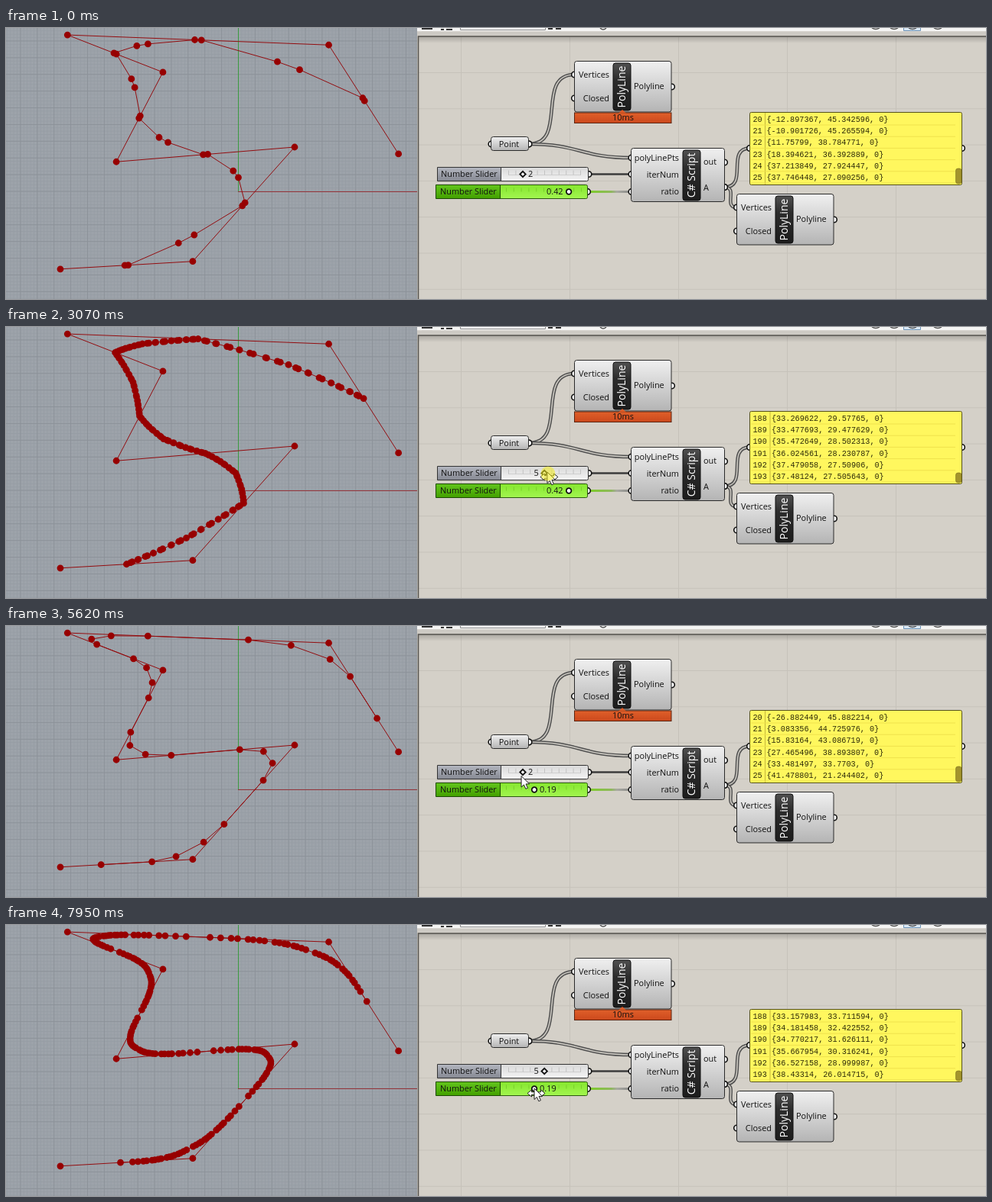
An HTML page that plays this animation: 1280 by 355 pixels, repeating every 8000 ms.

```html
<!DOCTYPE html>
<html lang="en">
<head>
<meta charset="utf-8">
<title>Corner cutting</title>
<style>
  html, body { margin: 0; width: 100%; height: 100%; overflow: hidden; background: #d4d0c8; }
  svg { display: block; width: 1280px; height: 355px; }
  text { font: 10.9px "Open Sans", "Noto Sans", sans-serif; fill: #111; white-space: pre; }
  .end { text-anchor: end; }
  .mid { text-anchor: middle; }
  .icon { font-size: 14px; fill: #fff; text-anchor: middle; }
  .mono text { font: 10.2px "Liberation Mono", "DejaVu Sans Mono", monospace; fill: #2c2a08; }
  .body { fill: url(#steel); stroke: #2a2a2a; }
  .plate { fill: url(#coal); stroke: #111; }
  .wire { fill: none; stroke: #505050; stroke-width: 4.6; }
  .core { fill: none; stroke: #c9c6bf; stroke-width: 1.7; }
  .core, .plug { marker-start: url(#plug); marker-end: url(#plug); }
  .line { fill: none; stroke: #930c0f; stroke-width: 1; }
  .dots { fill: none; stroke: #970000; stroke-width: 8.8; stroke-linecap: round; }
  .knob { fill: #fff; stroke: #111; stroke-width: 1.8; }
  .hand { fill: #fff; stroke: #222; stroke-width: 1; stroke-linejoin: round; }
</style>
</head>
<body>
<svg viewBox="0 0 1280 355">
  <defs>
    <linearGradient id="steel" x2="0" y2="1"><stop stop-color="#f0f0f0"/><stop offset="1" stop-color="#b4b4b4"/></linearGradient>
    <linearGradient id="coal" x2="0" y2="1"><stop stop-color="#505050"/><stop offset=".35" stop-color="#2c2c2c"/><stop offset="1" stop-color="#1c1c1c"/></linearGradient>
    <linearGradient id="rust" x2="0" y2="1"><stop stop-color="#e0602a"/><stop offset="1" stop-color="#cb481c"/></linearGradient>
    <linearGradient id="slate" x2="0" y2="1"><stop stop-color="#b4b7c0"/><stop offset="1" stop-color="#858892"/></linearGradient>
    <linearGradient id="chalk" x2="0" y2="1"><stop stop-color="#d9d9d9"/><stop offset="1" stop-color="#f4f4f4"/></linearGradient>
    <linearGradient id="leaf" x2="0" y2="1"><stop stop-color="#62c41c"/><stop offset="1" stop-color="#43a000"/></linearGradient>
    <linearGradient id="lime" x2="0" y2="1"><stop stop-color="#86e62e"/><stop offset="1" stop-color="#a2f650"/></linearGradient>
    <linearGradient id="fade" gradientUnits="userSpaceOnUse" x1="763" x2="813"><stop stop-color="#7ecb2c"/><stop offset=".55" stop-color="#8fb85c"/><stop offset=".7" stop-color="#a9a9a3"/><stop offset="1" stop-color="#8f8f8b"/></linearGradient>
    <linearGradient id="shade" x2="0" y2="1"><stop stop-color="#000" stop-opacity=".2"/><stop offset="1" stop-color="#000" stop-opacity="0"/></linearGradient>
    <pattern id="fine" width="4.378" height="4.378" patternUnits="userSpaceOnUse" x="303" y="213.5"><path d="M.5 0V5M0 .5H5" stroke="#969ca3" stroke-width=".8"/></pattern>
    <pattern id="bold" width="21.89" height="21.89" patternUnits="userSpaceOnUse" x="303" y="213.5"><path d="M.5 0V22M0 .5H22" stroke="#8c9299"/></pattern>
    <pattern id="sheet" width="142" height="47.3" patternUnits="userSpaceOnUse" x="594" y="58"><path d="M.5 0V48M0 .5H142" stroke="#c6c2ba"/></pattern>
    <circle id="grip" r="3.8" fill="#fff" stroke="#111" stroke-width="1.6"/>
    <marker id="plug" markerUnits="userSpaceOnUse" markerWidth="10" markerHeight="10" refX="5" refY="5"><use href="#grip" x="5" y="5"/></marker>
    <g id="poly">
      <use href="#grip" x="742.5" y="92"/><use href="#grip" x="869.5" y="77"/>
      <rect class="body" x="742.5" y="43.5" width="126.5" height="66.5" rx="3"/>
      <rect class="plate" x="793" y="46" width="23" height="62" rx="3"/>
      <text class="icon" transform="translate(809 77) rotate(-90)">PolyLine</text>
      <text class="end" x="788" y="65">Vertices</text>
      <text class="end" x="788" y="96">Closed</text>
      <text x="820" y="80">Polyline</text>
    </g>
  </defs>

  <!-- viewport -->
  <rect width="537" height="355" fill="#9da3aa"/>
  <rect width="537" height="355" fill="url(#fine)"/>
  <rect width="537" height="355" fill="url(#bold)"/>
  <path d="M303.5 0V214" stroke="#3a9a3f"/>
  <path d="M303 214.5H537" stroke="#96343a"/>
  <path id="frame" class="line"/>
  <path id="curve" class="line"/>
  <path id="dots" class="dots"/>

  <!-- canvas -->
  <rect x="537" width="743" height="355" fill="#d4d0c8"/>
  <rect x="539" y="11" width="741" height="344" fill="url(#sheet)"/>
  <rect x="539" y="11" width="741" height="9" fill="url(#shade)"/>
  <rect x="537" width="743" height="4.5" fill="#f5f5f4"/>
  <rect x="537" y="4.5" width="743" height="6" fill="#cdcac4"/>
  <path d="M538.5 355V11H1280" fill="none" stroke="#55534f" stroke-width="1.6"/>
  <path d="M593.5 0V2.5H704.5V0" fill="#fff" stroke="#888"/>
  <path d="M543 1H557M568 2H572M575 2H583M708 1H714M718 1H725" stroke="#333" stroke-width="2"/>
  <path d="M1172.5 0V3.5H1194.5V0" fill="#d9e8f6" stroke="#6d94b8"/>
  <path d="M1131 0q5 3 10 0m14 0q5 3 10 0m14 0q5 3 10 0m23 0q5 3 10 0M776 0q4 4 8 0" fill="none" stroke="#555" stroke-width="1.4"/>

  <g id="wires"></g>
  <path class="plug" d="M761 191.5H817" stroke="#3c3c3c" stroke-width="2.6"/>
  <path class="plug" d="M759.5 214.4L817 214.5" stroke="url(#fade)" stroke-width="3"/>
  <use href="#grip" x="634" y="152"/>
  <use href="#grip" x="938.5" y="176"/>
  <use href="#grip" x="1248.5" y="157.5"/>

  <use href="#poly"/>
  <rect x="742.5" y="111" width="126.5" height="13.5" fill="url(#rust)" stroke="#5c2410"/>
  <path d="M800 111.5L805 107L810 111.5Z" fill="#dc5a26"/>
  <text class="mid" x="806" y="121">10ms</text>
  <use href="#poly" x="212" y="174"/>

  <rect class="body" x="633.5" y="142.5" width="49" height="18" rx="3"/>
  <text class="mid" x="657" y="155.5">Point</text>

  <rect class="body" x="816.5" y="157.5" width="122" height="70" rx="3"/>
  <rect class="plate" x="884" y="160" width="23" height="66" rx="3"/>
  <text class="icon" transform="translate(900 193) rotate(-90)">C# Script</text>
  <text class="end" x="879" y="174">polyLinePts</text>
  <text class="end" x="879" y="195.5">iterNum</text>
  <text class="end" x="879" y="218">ratio</text>
  <text x="911" y="179">out</text>
  <text x="911" y="212.5">A</text>

  <!-- sliders -->
  <rect x="563.5" y="182.5" width="197" height="18" rx="2" fill="url(#chalk)" stroke="#333"/>
  <path d="M563.5 182.5H646.5V200.5H563.5Z" fill="url(#slate)" stroke="#333"/>
  <text x="568" y="195">Number Slider</text>
  <path d="M656 192.5H751" stroke="#cfcfcf"/>
  <path d="M656 189.5H751.5" stroke="#c2c2c2" stroke-width="6" stroke-dasharray="1 8.4"/>
  <rect x="561.5" y="205.5" width="198" height="18" rx="2" fill="url(#lime)" stroke="#2c5a10"/>
  <path d="M561.5 205.5H645.5V223.5H561.5Z" fill="url(#leaf)" stroke="#1d4a05"/>
  <text x="567" y="218">Number Slider</text>
  <path d="M653 212H752" stroke="#79cf2c" stroke-width="5" stroke-dasharray="1 8.8"/>
  <path id="iterKnob" class="knob" d="M-3.7 0L0-3.7L3.7 0L0 3.7Z"/>
  <text id="iterText" y="195"></text>
  <circle id="ratioKnob" class="knob" r="3.3"/>
  <text id="ratioText" y="218"></text>

  <!-- panel -->
  <rect x="971.5" y="110.5" width="277" height="95" rx="2" fill="#fff75e" stroke="#55511c"/>
  <path id="column" stroke="#c4b83a"/>
  <rect id="thumb" x="1240.5" width="7.5" rx="3" fill="#a3942c" stroke="#7a6e1c" stroke-width=".6"/>
  <g id="rows" class="mono"></g>

  <g id="cursor">
    <path id="arrows" class="hand" d="M-9 6.5L-3.5 2V4.8H8.5V2L14 6.5L8.5 11V8.2H-3.5V11Z"/>
    <path class="hand" d="M0 0V14.5L3.4 11.4L5.8 16.8L8.4 15.7L6 10.4H10.6Z"/>
    <circle id="press" cx="1" cy="2" r="9.5" fill="#f4ec1c" opacity=".55"/>
  </g>
</svg>
<script>
const LOOP = 8000, SCALE = 4.378, OX = 303, OY = 214;
const CORNERS = [[-53, -23.25], [-13.5, -20.95], [16.9, 13.25], [-36.3, 8.85], [-22.4, 35.65],
  [-50.876921, 46.808047], [27.077828, 43.8001425], [47.8824695, 11.21456]];

// Pointer stops: time, x, y
const STOPS = [[70, 1048, 305], [480, 572, 182], [850, 675, 193], [2460, 676, 187], [3070, 707, 190],
  [3600, 677, 189], [3930, 729, 215], [4250, 752, 223], [4720, 733, 213], [5160, 688, 214],
  [5900, 664, 186], [6420, 676, 189], [7020, 704, 192], [7250, 702, 222], [7950, 690, 214]];

// Spans during which the pointer drags a knob
const ITER_DRAGS = [[2460, 3600], [6420, 7020]], RATIO_DRAG = [4720, 5160];

const $ = id => document.getElementById(id);
const show = (id, on) => $(id).style.display = on ? "" : "none";
const clamp = (v, [lo, hi]) => Math.min(hi, Math.max(lo, v));
const mix = (a, b, k) => a.map((v, i) => v + (b[i] - v) * k);

function pointer(t) {
  t = clamp(t, [STOPS[0][0], STOPS.at(-1)[0]]);
  const i = Math.max(1, STOPS.findIndex(s => s[0] >= t));
  const a = STOPS[i - 1], b = STOPS[i];
  return mix(a, b, (t - a[0]) / (b[0] - a[0])).slice(1);
}

// A knob follows the pointer while dragged and rests otherwise
const iterX = n => 656.2 + n * 9.4, ratioX = r => 652.8 + r * 196;
function iterAt(t) {
  const drag = ITER_DRAGS[t < ITER_DRAGS[1][0] ? 0 : 1];
  return Math.round((pointer(clamp(t, drag))[0] - iterX(0)) / 9.4);
}
function ratioAt(t) {
  const x = pointer(clamp(t, RATIO_DRAG))[0] + 2;
  return Math.round((x - ratioX(0)) / 1.96) / 100;
}

const cut = (points, ratio) =>
  points.slice(1).flatMap((p, i) => [mix(points[i], p, ratio), mix(points[i], p, 1 - ratio)]);
const toPixel = ([x, y]) => (OX + x * SCALE).toFixed(2) + " " + (OY - y * SCALE).toFixed(2);
const polyline = points => "M" + points.map(toPixel).join("L");
const spots = points => points.map(p => `M${toPixel(p)}h.01`).join("");

function wire(x1, y1, x2, y2, pull = 52) {
  const d = `M${x1} ${y1}C${x1 + pull} ${y1} ${x2 - pull} ${y2} ${x2} ${y2}`;
  return `<path class="wire" d="${d}"/><path class="core" d="${d}"/>`;
}

$("frame").setAttribute("d", polyline(CORNERS));
$("wires").innerHTML = wire(683, 152, 742.5, 61) + wire(683, 152, 817, 170, 66)
  + wire(938.5, 208.5, 971.5, 157.5, 32) + wire(938.5, 208.5, 954.5, 235, 18);
$("rows").innerHTML = Array.from({ length: 6 }, (_, i) => {
  const y = 123 + i * 15.2;
  return `<path d="M973 ${y + 4}H1240" stroke="#efe24c"/><text x="975.5" y="${y}"></text><text y="${y}"></text>`;
}).join("");
const cells = $("rows").querySelectorAll("text");

function setSlider(name, x, y, label, left) {
  $(name + "Knob").setAttribute("transform", `translate(${x} ${y})`);
  const text = $(name + "Text");
  text.textContent = label;
  text.setAttribute("x", x + (left ? -7.5 : 7));
  text.setAttribute("class", left ? "end" : "");
}

let shown = "";
function rebuild(iter, ratio) {
  const key = iter + "/" + ratio;
  if (key === shown) return;
  shown = key;
  let points = CORNERS;
  for (let i = 0; i < iter; i++) points = cut(points, ratio);
  $("curve").setAttribute("d", polyline(points));
  $("dots").setAttribute("d", spots(CORNERS) + spots(points));

  setSlider("iter", iterX(iter), 191.5, iter, iter >= 5);
  setSlider("ratio", ratioX(ratio), 214.5, ratio.toFixed(2), ratio > .25);

  const first = points.length - 6, left = points.length > 100 ? 1000 : 993.5;
  points.slice(-6).forEach(([x, y], i) => {
    cells[2 * i].textContent = first + i;
    cells[2 * i + 1].textContent = `{${+x.toFixed(6)}, ${+y.toFixed(6)}, 0}`;
    cells[2 * i + 1].setAttribute("x", left);
  });
  $("column").setAttribute("d", `M${left - 2} 111V205`);
  const height = Math.max(13, 520 / points.length);
  $("thumb").setAttribute("y", 204 - height);
  $("thumb").setAttribute("height", height);
}

function draw() {
  const t = performance.now() % LOOP;
  const iter = iterAt(t), ratio = ratioAt(t), [x, y] = pointer(t);
  rebuild(iter, ratio);

  const held = [...ITER_DRAGS, RATIO_DRAG].some(([a, b]) => t >= a && t < b);
  const near = (kx, ky) => Math.hypot(x - kx, y - ky) < 5;
  $("cursor").setAttribute("transform", `translate(${x} ${y})`);
  show("cursor", t >= 70);
  show("press", held);
  show("arrows", held || near(iterX(iter), 191.5) || near(ratioX(ratio), 214.5));
  requestAnimationFrame(draw);
}
draw();
</script>
</body>
</html>
```
